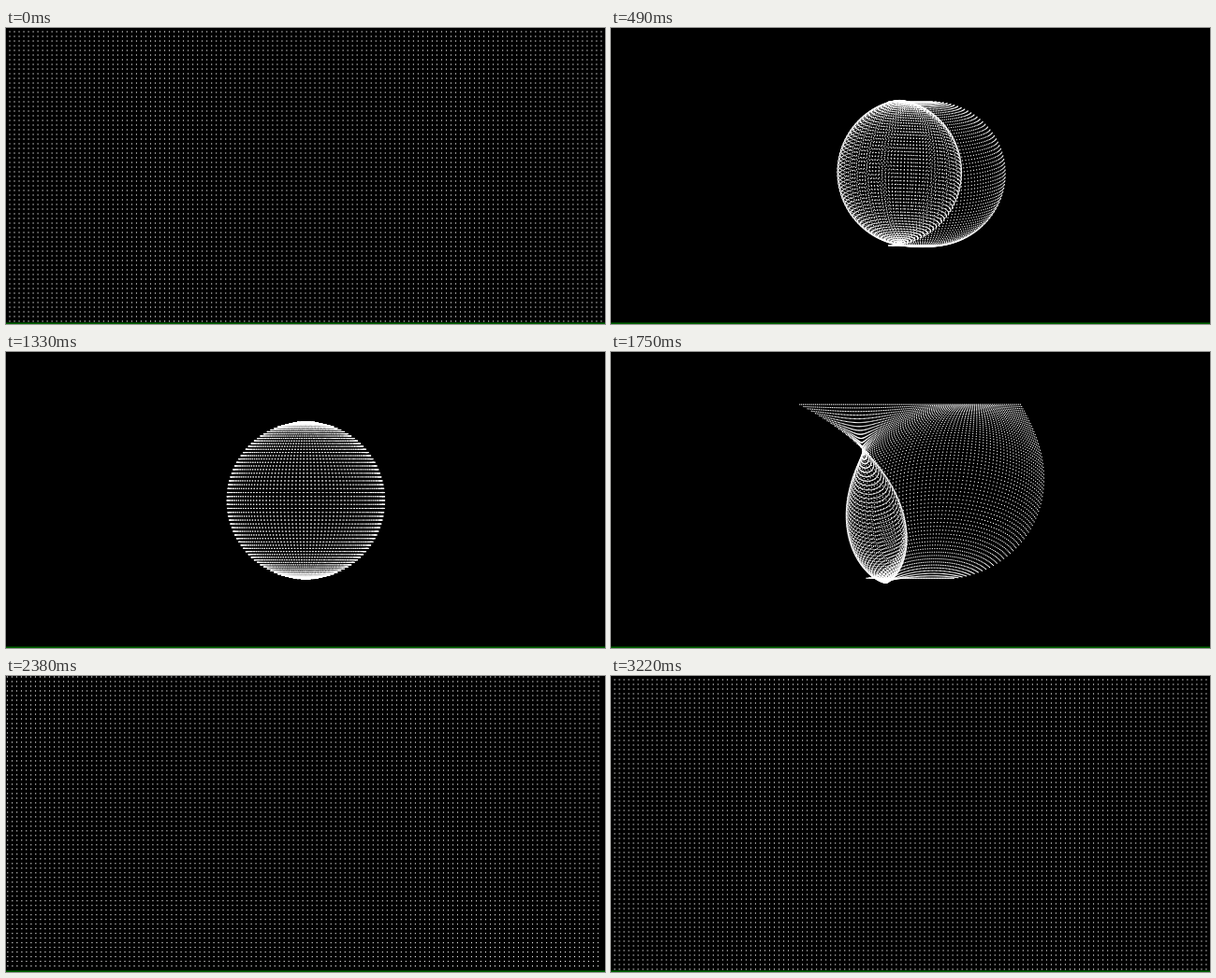
Animation of 640x317 px, one loop 3.29 s. Source, as an HTML page without scripts:

```html
<!DOCTYPE html>
<html lang="en">
<head>
<meta charset="utf-8">
<title>Dot grid and sphere</title>
<style>
  @property --t  { syntax: "<number>"; inherits: true; initial-value: 0; }
  @property --gather { syntax: "<number>"; inherits: true; initial-value: 1; }
  @property --tilt { syntax: "<angle>"; inherits: true; initial-value: 0deg; }
  @property --sa { syntax: "<number>"; inherits: true; initial-value: 0; }
  @property --ca { syntax: "<number>"; inherits: true; initial-value: 1; }
  @property --cx { syntax: "<number>"; inherits: true; initial-value: 320; }
  @property --cy { syntax: "<number>"; inherits: true; initial-value: 159; }
  @property --v  { syntax: "<number>"; inherits: true; initial-value: 0; }
  @property --spread { syntax: "<number>"; inherits: true; initial-value: 0; }
  @property --w  { syntax: "<number>"; inherits: true; initial-value: 1; }
  @property --r  { syntax: "<number>"; inherits: true; initial-value: 0; }
  @property --y  { syntax: "<number>"; inherits: true; initial-value: 0; }
  @property --u  { syntax: "<number>"; inherits: true; initial-value: 0; }

  html, body { margin: 0; width: 100%; height: 100%; overflow: hidden; background: #000; }
  svg { display: block; width: 640px; height: 317px; overflow: hidden;
        animation: tick 3.29s steps(47) infinite; }
  @keyframes tick { from { --t: 0; } to { --t: 47; } }

  /* shared by every dot: folding, tilt and drift of the centre */
  .cloud {
    --gather: calc(1 / (1 + pow(var(--t) / 3.37, 3.45)));
    --tilt: calc(13deg * (1 - exp((var(--t) - 19) / 4.83)));
    --sa: sin(var(--tilt));
    --ca: cos(var(--tilt));
    --cx: calc(320 - 2.8 * exp(-1 * pow((var(--t) - 33.5) / 6, 2)));
    --cy: calc(159 - 3 * exp(-1 * pow((var(--t) - 7) / 3, 2))
                   - 4.2 * exp(-1 * pow((var(--t) - 31.7) / 4.2, 2)));
    fill: #fff;
  }
  /* one row: v runs -1..1, w is the weight of the flat grid */
  .row {
    --v: calc((var(--band) * 7 + var(--m)) / 31 - 1);
    --spread: calc(1 / (1 + exp((26.29 + .7 * var(--v) - var(--t)) / 1.136)));
    --w: max(var(--gather), var(--spread));
    --r: calc(84 * (1 - var(--w)) * cos(var(--v) * 90deg));
    --y: calc(var(--cy)
      + 155 * var(--v) * max(pow(var(--gather), 2), var(--spread))
      + 84 * (1 - var(--w)) * sin(var(--v) * 90deg) * var(--ca));
  }
  /* one dot: u runs -1..1 and wraps once round the sphere */
  .dot {
    --u: calc((var(--oct) * 8 + var(--c)) / 63 - 1);
    x: calc((var(--cx) + 316 * var(--w) * var(--u)
      + var(--r) * cos((var(--u) + 1) * 180deg) - .55) * 1px);
    y: calc((var(--y) - var(--r) * var(--sa) * sin((var(--u) + 1) * 180deg) - .55) * 1px);
    width: 1.1px;
    height: 1.1px;
  }
</style>
</head>
<body>
<svg viewBox="0 0 640 317">
  <defs>
    <g id="seven">
      <rect class="dot" style="--c:0"/>
      <rect class="dot" style="--c:1"/>
      <rect class="dot" style="--c:2"/>
      <rect class="dot" style="--c:3"/>
      <rect class="dot" style="--c:4"/>
      <rect class="dot" style="--c:5"/>
      <rect class="dot" style="--c:6"/>
    </g>
    <g id="eight">
      <use href="#seven"/>
      <rect class="dot" style="--c:7"/>
    </g>
    <g id="line">
      <use href="#eight" style="--oct:0"/>
      <use href="#eight" style="--oct:1"/>
      <use href="#eight" style="--oct:2"/>
      <use href="#eight" style="--oct:3"/>
      <use href="#eight" style="--oct:4"/>
      <use href="#eight" style="--oct:5"/>
      <use href="#eight" style="--oct:6"/>
      <use href="#eight" style="--oct:7"/>
      <use href="#eight" style="--oct:8"/>
      <use href="#eight" style="--oct:9"/>
      <use href="#eight" style="--oct:10"/>
      <use href="#eight" style="--oct:11"/>
      <use href="#eight" style="--oct:12"/>
      <use href="#eight" style="--oct:13"/>
      <use href="#eight" style="--oct:14"/>
      <use href="#seven" style="--oct:15"/>
    </g>
    <g id="band">
      <use class="row" href="#line" style="--m:0"/>
      <use class="row" href="#line" style="--m:1"/>
      <use class="row" href="#line" style="--m:2"/>
      <use class="row" href="#line" style="--m:3"/>
      <use class="row" href="#line" style="--m:4"/>
      <use class="row" href="#line" style="--m:5"/>
      <use class="row" href="#line" style="--m:6"/>
    </g>
  </defs>
  <rect width="640" height="317"/>
  <g class="cloud">
    <use href="#band" style="--band:0"/>
    <use href="#band" style="--band:1"/>
    <use href="#band" style="--band:2"/>
    <use href="#band" style="--band:3"/>
    <use href="#band" style="--band:4"/>
    <use href="#band" style="--band:5"/>
    <use href="#band" style="--band:6"/>
    <use href="#band" style="--band:7"/>
    <use href="#band" style="--band:8"/>
  </g>
  <rect y="315.5" width="640" height="1.5" fill="#006400"/>
</svg>
</body>
</html>
```
